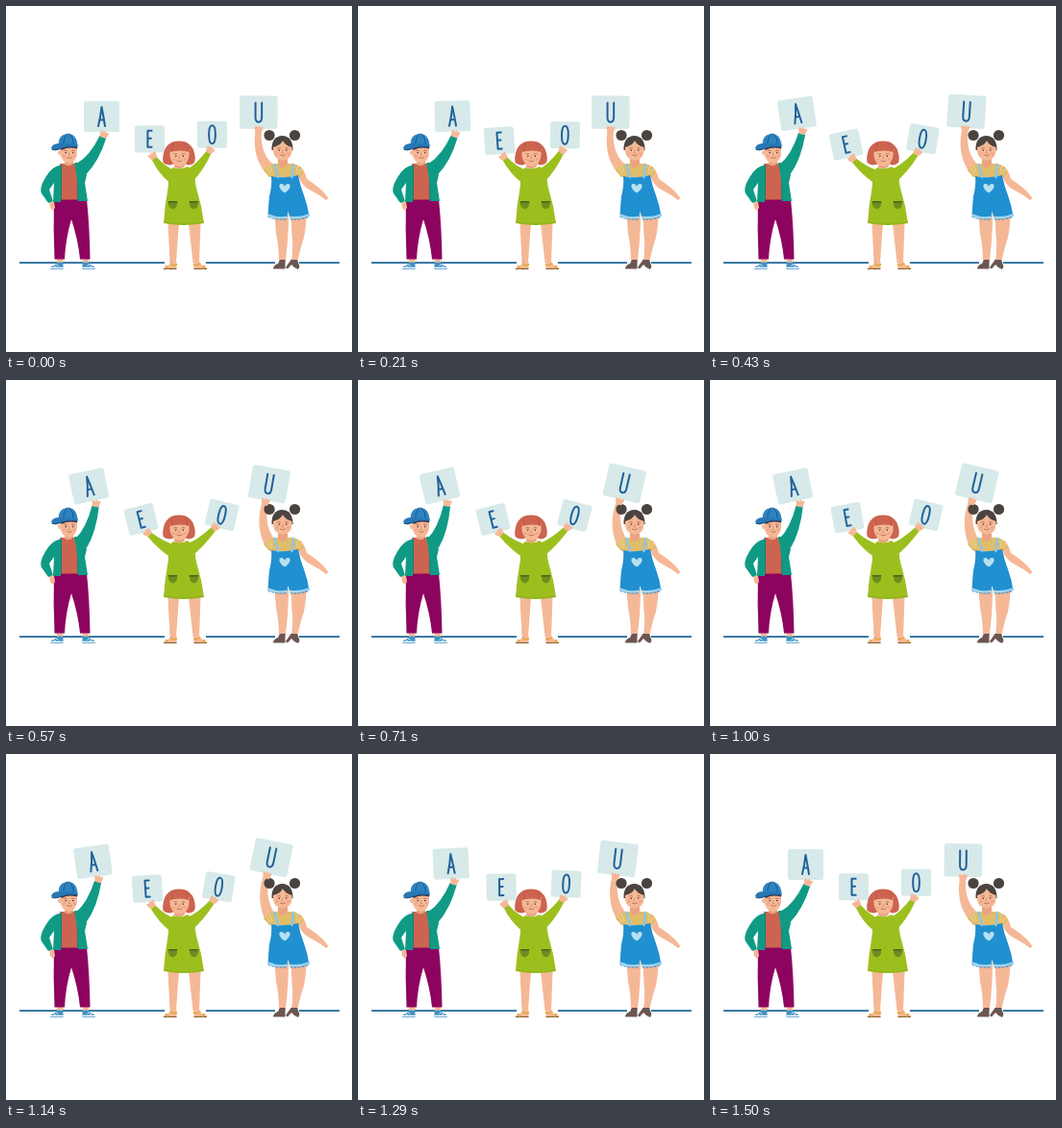
An HTML page that plays this animation: 360x360 px, repeating every 1.57 s.

```html
<!DOCTYPE html>
<html lang="en">
<head>
<meta charset="utf-8">
<title>Children with vowel cards</title>
<style>
  html, body { margin: 0; width: 100%; height: 100%; overflow: hidden; background: #fff; }
  svg { display: block; width: 100vw; height: 100vh; }
  .skin { fill: #f5b896; }
  .line { fill: none; stroke-linecap: round; stroke-linejoin: round; }
  .ink { stroke: #20619a; stroke-width: 2; }
  .red { fill: #cd6450; }
  .teal { fill: #109a85; }
  .green { fill: #9cbf1e; }
  .blue { fill: #2190d0; }
  .dark { fill: #4b433f; }
</style>
</head>
<body>
<svg viewBox="0 0 360 360">
  <defs>
    <g id="face">
      <path d="M-5.5-2.6q1.5-1 3 0M2.5-2.6q1.5-1 3 0M-2.5 4.6q2.5 1.8 5 0" class="line" stroke="#a05a48" stroke-width=".7"/>
      <path d="M0-.5l-1 3h1.6" class="line" stroke="#dd8b70" stroke-width=".8"/>
      <circle cx="-3.8" cy="-.4" r=".8" fill="#4b3430"/>
      <circle cx="3.8" cy="-.4" r=".8" fill="#4b3430"/>
      <g fill="#ef9a80" opacity=".6"><circle cx="-5.6" cy="3" r="1.6"/><circle cx="5.6" cy="3" r="1.6"/></g>
    </g>
    <g id="sneaker">
      <path d="M-6.5 4.5Q-6.500 1-2 0L2-3L7-2.5V4.5Z" fill="#3d92c8"/>
      <path d="M-6.5 3H7" stroke="#fff" stroke-width="1.4"/>
      <path d="M-3 .5l2 1.5M-.5-1l2 2" class="line" stroke="#fff" stroke-width="1"/>
    </g>
    <g id="sandal">
      <path d="M-6.5 4Q-6 1-1 0L1-3H7V4Z" class="skin"/>
      <path d="M-6.5 4H7" stroke="#8a6238" stroke-width="1.2"/>
      <path d="M-4 1.2l2 2.3M1-1.5Q4 1.5 7-.5" class="line" stroke="#e3a53e" stroke-width="1.6"/>
    </g>
    <g id="pocket">
      <path d="M-4.5 0H4.5V3Q4.5 7 0 8.5Q-4.5 7-4.5 3Z" fill="#6f8d1f"/>
      <path d="M-4.8 .8H4.8" stroke="#46601d" stroke-width="1.4"/>
    </g>
  </defs>

  <path d="M14 267.2H165M208 267.2H280M305 267.2H347" stroke="#1f6799" stroke-width="1.7"/>
  <g id="arms"></g>

  <g id="boy">
    <path d="M53 258H59V268H53ZM80 258H86V268H80Z" class="skin"/>
    <use href="#sneaker" x="52.5" y="269.5"/>
    <use href="#sneaker" transform="translate(86.5 269.5) scale(-1 1)"/>
    <path d="M50 201H84Q87 230 87.5 263.5H77Q75 243 68 222Q62 242 61 263.5H50.5Q49 232 50 201Z" fill="#8d0460"/>
    <path d="M45 203l5 1 1 6-2 3-3-3Z" class="skin"/>
    <path d="M56 164H75V201.5H56Z" class="red"/>
    <path d="M58 165L52 167Q45 170 38 184Q35 191 37 195L44 205L49 203L45 191L50 184L49 204H57Z" class="teal"/>
    <path d="M71 163L79 163L84 176L82 184L85 203H75Q75 180 71 163Z" class="teal"/>
    <path d="M57.5 166V202M74.5 182V202" stroke="#0b7769" stroke-width=".7"/>
    <path d="M61 157H70V164Q66 168 61 165Z" fill="#eba481"/>
    <path d="M56 145H74V153Q73 163 65.5 163.5Q58 163 56 153Z" class="skin"/>
    <circle cx="56.5" cy="152.5" r="2.5" class="skin"/>
    <path d="M56 146H74V148.5Q65 146 58 150Z" fill="#4a2f2c"/>
    <path d="M55 147Q53 134 64 133Q74 133 74.5 146Q65 144 55 147Z" fill="#2d83be"/>
    <path d="M64 133Q59 138 60 145M66 133Q71 138 70 144" class="line" stroke="#1b588f" stroke-width="1"/>
    <path d="M56 143Q48 143 47 148Q50 151.5 56 149Q64 145 74.5 147V144.5Q64 142 56 143Z" fill="#2878b6"/>
    <path d="M48 149.5Q52 151 56 148.5Q65 145 74 147" class="line" stroke="#1b4f80" stroke-width="1"/>
    <use href="#face" x="66" y="153"/>
  </g>

  <g id="redhead">
    <path d="M168.5 226H180L177 267H170.5ZM190 226H202.5L201 267H194.5Z" class="skin"/>
    <use href="#sandal" x="170.5" y="269.5"/>
    <use href="#sandal" transform="translate(202.5 269.5) scale(-1 1)"/>
    <path d="M174 168Q182 171 189 167L197 174Q196 183 199 193Q204 209 206 226Q185 230 164 226Q165 209 168 193Q170 182 168 174Z" class="green"/>
    <path d="M164.5 225Q185 229 205.8 225" class="line" stroke="#8bab1d" stroke-width=".8"/>
    <use href="#pocket" x="173.5" y="203"/>
    <use href="#pocket" x="195.5" y="203"/>
    <path d="M164 153Q167 140.500 180 140.5Q193 140.5 196 153Q197.5 159 196 163Q192 167 187 164.500H174Q168 167 163.5 163Q162.5 158 164 153Z" class="red"/>
    <path d="M176 160H186V167Q181 171 175 168Z" fill="#eba481"/>
    <path d="M170.5 149H190.5V156Q189 166 180.500 166.5Q172 166 170.500 156Z" class="skin"/>
    <path d="M170 152Q170 144 180 143Q190 144 191 152Q181 149 170 152Z" class="red"/>
    <path d="M175 142Q172 146 172 151M186 142Q189 146 189 151" class="line" stroke="#b2503f" stroke-width=".6"/>
    <use href="#face" x="180.5" y="156.5"/>
  </g>

  <g id="brunette">
    <path d="M279.5 217H294Q294 243 290.5 267H284Q284 250 281 237ZM296.5 217H312.500Q312 238 308 247L303 266H297Q299 250 297.5 239Z" class="skin"/>
    <path d="M303 166L307 167.5Q311 172 313 180Q323 186 330 193L335.5 200L333 202L327 197.500L313 189.5Q307 185 304 177Z" class="skin"/>
    <path d="M278 273.5Q278 270 283 268L285 264H290.5V273.5ZM291 272L296.5 264H303L305.5 271L304 274Q300 273 297 269L293 273.500Z" fill="#6b5553"/>
    <path d="M280 164Q272 165 268 171L274 178H305L310 174Q307 165 298 164Z" fill="#e1bd69"/>
    <path d="M271 168l4 7M274 166l3 8M304 166l-2 8M308 169l-4 6" stroke="#edd69b" stroke-width="1"/>
    <path d="M276 177Q288 180 304 176Q306 187 310 197Q314 208 315.500 219Q305 222.5 295.5 221L293.5 214L292 221.5Q281 222 272.500 218.5Q273 208 274 198Q277 187 276 177Z" class="blue"/>
    <path d="M273 217.5Q282 221.5 292 220M296 220Q306 221 315 217.5" class="line" stroke="#a2d5ee" stroke-width="2.4"/>
    <path d="M273 219.5Q282 223 292 222M296 222Q306 223 315 219.5" class="line" stroke="#2480bb" stroke-width=".8" stroke-dasharray="2 2"/>
    <path d="M279.5 165L283 178M299 165L297.5 178" class="line" stroke="#8ec5e5" stroke-width="2.6"/>
    <path d="M290 194.5C282 189 284 184.5 287 185Q289 185.3 290 187.5Q291 185.3 293 185C296 184.5 298 189 290 194.5Z" fill="#b8e0f2"/>
    <path d="M283 157H293V165Q288 171 283 166Z" fill="#eba481"/>
    <g class="dark">
      <circle cx="274" cy="134.5" r="5.6"/>
      <circle cx="300.5" cy="134.5" r="5.6"/>
      <path d="M276.5 150Q276 135.5 287.5 135Q298.5 135.5 298.5 150Z"/>
    </g>
    <path d="M278 147Q286 145 288 140Q290 145 297.5 147V152Q296 160 288 160.5Q279.5 160 278 152Z" class="skin"/>
    <use href="#face" x="288" y="150.5"/>
  </g>
  <g id="hands"></g>
</svg>
<script>
const LOOP = 1570, STEPS = 22;

// Each pair holds the lowest and highest pose; lag shifts the swing in steps.
const arms = [
  { fill: 'teal', lag: 0, size: [37, 32], card: [[99.5, 115], [85, 110]], turn: -13,
    root: [78, 170], bend: [[92, 159], [88.5, 156]], hand: [[101, 136], [92.5, 130.5]], width: [7.5, 3.6],
    letter: 'M-3.5 10Q-1 0 0-10Q2 0 3.5 10M-2.2 3.5H2.2' },
  { fill: 'green', lag: -1.5, size: [31, 28], card: [[149.5, 138.3], [140.5, 145]], turn: -14,
    root: [174, 178], bend: [[162, 171], [162, 173]], hand: [[154, 158], [149, 160.5]], width: [7, 2.8],
    letter: 'M2.2-8.5H-2V8.5H2.2M-2-.5H1.5' },
  { fill: 'green', lag: 0, size: [31, 28], card: [[214.5, 133.7], [225.5, 141]], turn: 15,
    root: [190, 177], bend: [[202, 168], [202, 171]], hand: [[211, 152], [216.5, 155]], width: [7, 2.8],
    letter: 'M0-9.5C-4.5-9.5-4.5 9.5 0 9.5S4.5-9.5 0-9.5' },
  { fill: 'skin', lag: 1.5, size: [39.5, 34.5], card: [[262.7, 110.7], [278, 107.3]], turn: 13.5,
    root: [275, 170], bend: [[260, 156], [265, 150]], hand: [[262.5, 131], [271.8, 128.5]], width: [6, 3.2],
    letter: 'M-3.3-10V5Q-3.3 10 0 10T3.3 5V-10' },
];

const $ = id => document.getElementById(id);
const mix = ([a, b], p) => a.map((v, i) => v + (b[i] - v) * p);

function add(parent, tag, attrs) {
  const node = document.createElementNS('http://www.w3.org/2000/svg', tag);
  for (const key in attrs) node.setAttribute(key, attrs[key]);
  return parent.appendChild(node);
}

for (const arm of arms) {
  const [w, h] = arm.size;
  arm.limb = add($('arms'), 'path', { class: arm.fill });
  arm.sheet = add($('arms'), 'g', {});
  add(arm.sheet, 'rect', { x: -w / 2, y: -h / 2, width: w, height: h, rx: 2.5, fill: '#d7e9e9' });
  add(arm.sheet, 'path', { d: arm.letter, class: 'line ink' });
  arm.palm = add($('hands'), 'path', { d: 'M-3 3L-4.5-2L-3.5-4L-1.5-2.5L0-4.5L1.5-3L4-4L4.5-2L3 3Z', class: 'skin' });
}

// Tapered curve from root to tip.
function limbPath(root, bend, tip, [wide, narrow]) {
  const side = (at, from, to, r) => {
    const dx = to[0] - from[0], dy = to[1] - from[1], k = r / Math.hypot(dx, dy);
    return [[at[0] - dy * k, at[1] + dx * k], [at[0] + dy * k, at[1] - dx * k]];
  };
  const a = side(root, root, bend, wide);
  const b = side(bend, root, tip, (wide + narrow) / 2);
  const c = side(tip, bend, tip, narrow);
  return `M${a[0]}Q${b[0]} ${c[0]}L${c[1]}Q${b[1]} ${a[1]}Z`;
}

function swing(step) {
  const u = 1 - Math.abs((step + STEPS) % STEPS / (STEPS / 2) - 1);
  return u < .5 ? 4 * u ** 3 : 1 - 4 * (1 - u) ** 3;
}

// Steps begin on whole hundredths of a second.
function stepAt(t) {
  const n = Math.round(t * STEPS / LOOP);
  return Math.round(n * LOOP / STEPS / 10) * 10 > t ? n - 1 : n;
}

function draw(now) {
  const step = stepAt(now % LOOP);
  for (const arm of arms) {
    const p = swing(step - arm.lag), tip = mix(arm.hand, p), bend = mix(arm.bend, p);
    const lean = Math.atan2(tip[0] - bend[0], bend[1] - tip[1]) * 180 / Math.PI;
    arm.limb.setAttribute('d', limbPath(arm.root, bend, tip, arm.width));
    arm.sheet.setAttribute('transform', `translate(${mix(arm.card, p)}) rotate(${arm.turn * p})`);
    arm.palm.setAttribute('transform', `translate(${tip}) rotate(${lean}) translate(0 -2)`);
  }
  requestAnimationFrame(draw);
}
draw(performance.now());
</script>
</body>
</html>
```
